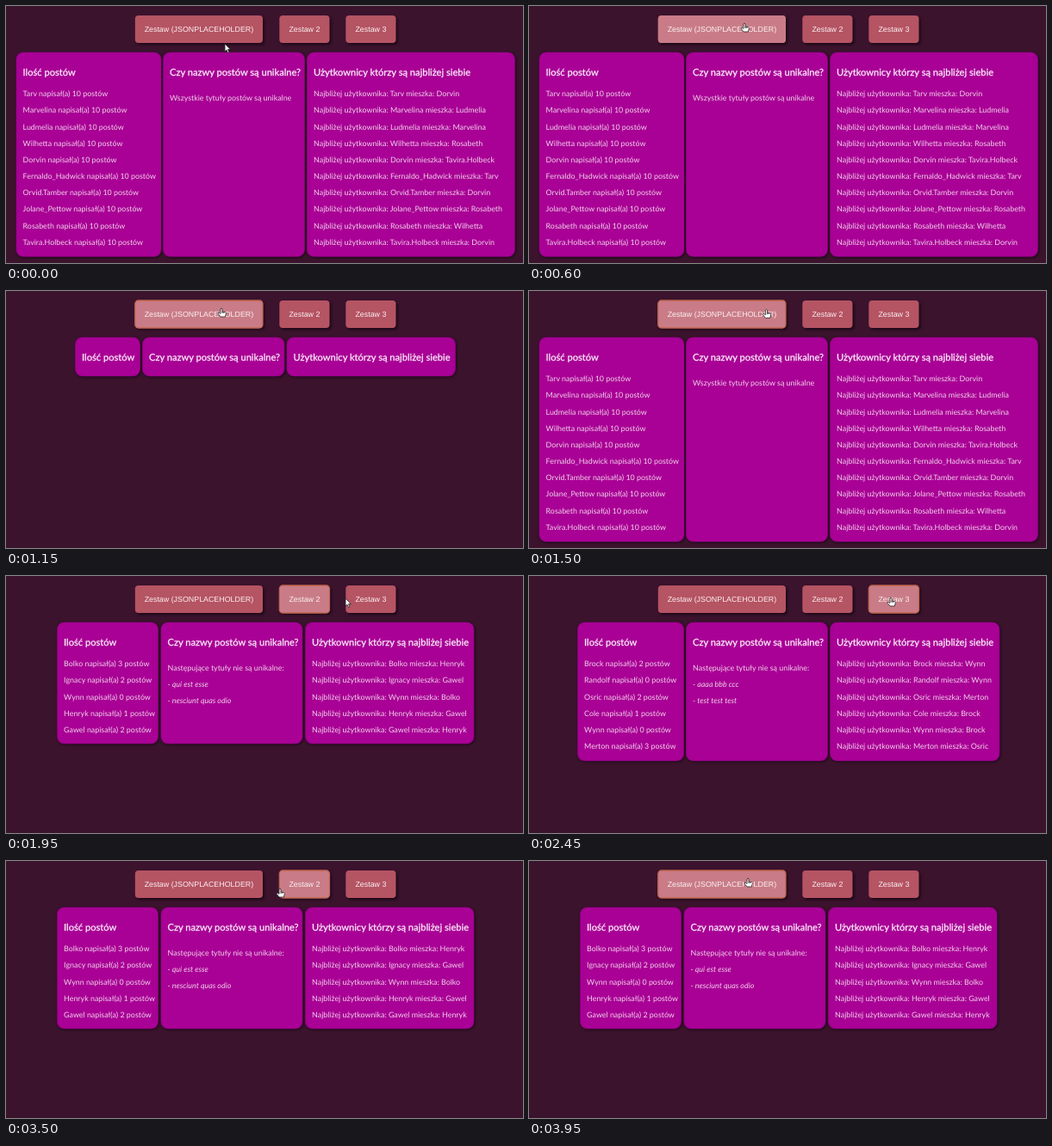
Recreate the animation shown at these times as an HTML page. Size 600 by 299 pixels, loop 4000 ms.

```html
<!DOCTYPE html>
<html lang="pl">
<head>
<meta charset="utf-8">
<title>Zestawy</title>
<style>
html, body { margin: 0; width: 100%; height: 100%; overflow: hidden; background: #3b132d; }
svg { display: block; width: 600px; height: 299px; }
text { font: 8.88px Lato, sans-serif; fill: #f1d3ec; white-space: pre; text-rendering: geometricPrecision; }
.title { font-size: 11.1px; fill: #fdf3fc; stroke: #fdf3fc; stroke-width: .25px; }
.italic { font-style: italic; }
.panel { fill: #a90095; stroke: #94058a; stroke-width: .6px; filter: drop-shadow(1px 1px 1.5px #1c0716); }
.button { fill: #b55463; filter: drop-shadow(2px 2px 1.5px #1c0716); }
.lit { fill: #c97c87; }
.ring { fill: none; stroke: #c2654f; stroke-width: 1.3px; }
.label { font: 8.87px "Liberation Sans", Arial, sans-serif; fill: #fbf0f2; text-anchor: middle; }
#cursor path { fill: #fff; stroke: #222; stroke-width: .8px; stroke-linejoin: round; }
</style>
</head>
<body>
<svg id="stage" viewBox="0 0 600 299"></svg>
<script>
const LOOP = 4000;
const titles = ["Ilość postów", "Czy nazwy postów są unikalne?", "Użytkownicy którzy są najbliżej siebie"];
const repeated = "Następujące tytuły nie są unikalne:";

// Each user: name, number of posts, index of the nearest user
const views = {
  first: {
    edges: [12, 180, 182.5, 346.5, 349.5, 590.5], bottom: 291.5,
    users: [["Tarv", 10, 4], ["Marvelina", 10, 2], ["Ludmelia", 10, 1], ["Wilhetta", 10, 8],
      ["Dorvin", 10, 9], ["Fernaldo_Hadwick", 10, 0], ["Orvid.Tamber", 10, 4],
      ["Jolane_Pettow", 10, 8], ["Rosabeth", 10, 3], ["Tavira.Holbeck", 10, 4]],
    notes: ["Wszystkie tytuły postów są unikalne"]
  },
  loading: {
    edges: [80.5, 155.5, 158.5, 323, 326, 521.5], bottom: 99, users: [], notes: []
  },
  second: {
    edges: [59.5, 176.5, 180, 344, 347.5, 543], bottom: 195,
    users: [["Bolko", 3, 3], ["Ignacy", 2, 4], ["Wynn", 0, 0], ["Henryk", 1, 4], ["Gawel", 2, 3]],
    notes: [repeated, "- qui est esse", "- nesciunt quas odio"]
  },
  third: {
    edges: [56.5, 179.5, 182.5, 346.5, 349.5, 546], bottom: 215,
    users: [["Brock", 2, 4], ["Randolf", 0, 4], ["Osric", 2, 5], ["Cole", 1, 0],
      ["Wynn", 0, 0], ["Merton", 3, 2]],
    notes: [repeated, "- aaaa bbb ccc", "- test test test"]
  }
};

// Buttons: lit spans cover hover and focus, ring spans cover focus
const buttons = [
  { x: 149.8, w: 148.2, label: "Zestaw (JSONPLACEHOLDER)", lit: [[430, 1560], [3700, 4000]], ring: [[1000, 1720], [3860, 4000]] },
  { x: 317.3, w: 58.2, label: "Zestaw 2", lit: [[1600, 2300], [2860, 3830]], ring: [[1720, 2300], [3100, 3860]] },
  { x: 394.3, w: 58.2, label: "Zestaw 3", lit: [[1960, 3100]], ring: [[2300, 3100]] }
];

const schedule = [[0, "first"], [1050, "loading"], [1300, "first"], [1800, "second"], [2400, "third"], [3200, "second"]];

const moves = [[0, 254, 44], [300, 254, 44], [520, 250, 20], [1420, 250, 20], [1660, 346, 25],
  [1780, 348, 25], [1950, 394, 26], [2150, 420, 25], [2600, 420, 25], [2850, 372, 36],
  [3030, 345, 32], [3300, 345, 32], [3500, 318, 32], [3800, 254, 20], [4000, 254, 20]];

const text = (x, y, s, cls = "") => `<text class="${cls}" x="${x}" y="${y}">${s}</text>`;
const rect = (cls, x, y, w, h, r) =>
  `<rect class="${cls}" x="${x}" y="${y}" width="${w}" height="${h}" rx="${r}"/>`;

function viewMarkup(id, { edges, bottom, users, notes }) {
  const rowY = i => 105.2 + 19.17 * i;
  const columns = [
    users.map(([name, posts], i) => [rowY(i), `${name} napisał(a) ${posts} postów`]),
    notes.map((note, i) => [rowY(i) + 4.7, note, i ? "italic" : ""]),
    users.map(([name, , near], i) => [rowY(i), `Najbliżej użytkownika: ${name} mieszka: ${users[near][0]}`])
  ];
  const panels = columns.map((rows, c) => {
    const left = edges[2 * c], x = left + 7.6;
    return rect("panel", left, 54, edges[2 * c + 1] - left, bottom - 54, 8) +
      text(x, 80.8, titles[c], "title") +
      rows.map(([y, s, cls]) => text(x, y, s, cls)).join("");
  });
  return `<g id="${id}">${panels.join("")}</g>`;
}

const buttonMarkup = ({ x, w, label }) =>
  rect("button", x, 11, w, 32, 4) + rect("lit", x, 11, w, 32, 4) +
  rect("ring", x, 11, w, 32, 4) + text(x + w / 2, 30.2, label, "label");

const stage = document.getElementById("stage");
stage.innerHTML = Object.entries(views).map(([id, v]) => viewMarkup(id, v)).join("") +
  buttons.map(buttonMarkup).join("") +
  `<g id="cursor">
    <path id="arrow" d="M0 0V9L2 7.2L3.6 10.6L5 10L3.5 6.6H6.3Z"/>
    <path id="hand" d="M-1 .8Q0-.6 1 .8V4L4.5 4.6Q5.5 5 5.2 6.5L4.4 10H-1L-3.8 6.4Q-4.2 5-2.8 5.2L-1 6.4ZM1 4V6M2.8 4.4V6"/>
  </g>`;

const el = id => document.getElementById(id);
const lits = stage.querySelectorAll(".lit"), rings = stage.querySelectorAll(".ring");
const clamp = v => Math.max(0, Math.min(1, v));
const within = (spans, t) => spans.some(([a, b]) => t >= a && t < b);
const fade = (spans, t) =>
  Math.max(...spans.map(([a, b]) => Math.min(clamp((t - a) / 150), clamp((b + 100 - t) / 100))));

function cursorAt(t) {
  const i = moves.findIndex(m => m[0] > t);
  const [t0, x0, y0] = moves[i - 1], [t1, x1, y1] = moves[i];
  const p = (t - t0) / (t1 - t0), e = p * p * (3 - 2 * p);
  return [x0 + (x1 - x0) * e, y0 + (y1 - y0) * e];
}

function draw(now) {
  const t = now % LOOP;
  const current = schedule.filter(([start]) => start <= t).pop()[1];
  for (const id in views) el(id).style.display = id === current ? "" : "none";
  buttons.forEach((b, i) => {
    lits[i].style.opacity = fade(b.lit, t);
    rings[i].style.opacity = within(b.ring, t) ? 1 : 0;
  });
  const [x, y] = cursorAt(t);
  const over = y > 11 && y < 43 && buttons.some(b => x >= b.x && x <= b.x + b.w);
  el("cursor").setAttribute("transform", `translate(${x} ${y})`);
  el("hand").style.display = over ? "" : "none";
  el("arrow").style.display = over ? "none" : "";
}

const start = performance.now();
function tick() {
  draw(performance.now() - start);
  requestAnimationFrame(tick);
}
tick();
</script>
</body>
</html>
```
